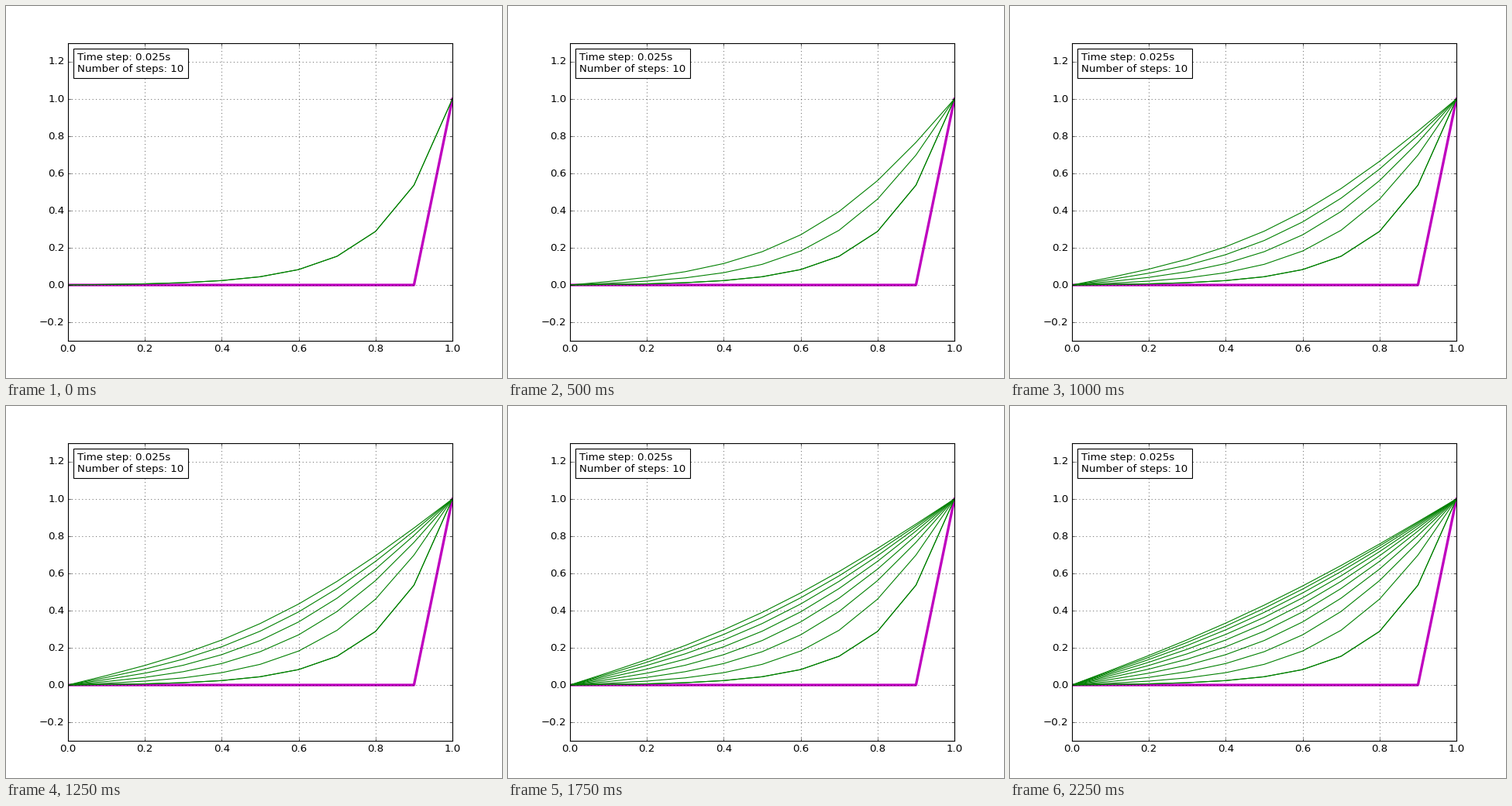
A matplotlib script that plays this animation: 640x480 px, repeating every 2500 ms.

```python
import numpy as np
import matplotlib.pyplot as plt
from matplotlib.animation import FuncAnimation
from matplotlib.offsetbox import AnchoredText

plt.style.use("classic")
plt.rcParams.update({
    "font.family": "DejaVu Sans",
    "figure.facecolor": "white",
    "savefig.dpi": "figure",
})

STEPS = 10
DT = 0.025
CELLS = 10
INTERVAL = 250

x = np.linspace(0, 1, CELLS + 1)
start = np.zeros(CELLS + 1)
start[-1] = 1


def diffusion_matrix(ratio):
    """Backward Euler matrix with fixed values at both ends."""
    matrix = np.eye(CELLS + 1)
    for i in range(1, CELLS):
        matrix[i, i - 1:i + 2] = -ratio, 1 + 2 * ratio, -ratio
    return matrix


def solve():
    matrix = diffusion_matrix(DT * CELLS ** 2)
    profiles = [start]
    for _ in range(STEPS):
        profiles.append(np.linalg.solve(matrix, profiles[-1]))
    return profiles[1:]


fig, ax = plt.subplots(figsize=(8, 6), dpi=80)
ax.set_xlim(0, 1)
ax.set_ylim(-0.3, 1.3)
ax.grid(True)
ax.add_artist(AnchoredText(
    f"Time step: {DT}s\nNumber of steps: {STEPS}",
    loc="upper left", prop={"size": 12}))

profiles = solve()
ax.plot(x, start, "m", lw=3)
ax.plot(x, profiles[0], "g", lw=1)  # the first step is drawn twice
curves = [ax.plot(x, u, "g", lw=1)[0] for u in profiles]


def update(frame):
    for i, curve in enumerate(curves):
        curve.set_visible(i <= frame)
    return curves


def reset():
    return update(0)


anim = FuncAnimation(fig, update, frames=STEPS, init_func=reset,
                     interval=INTERVAL, repeat=True, repeat_delay=0)
plt.show()
```
